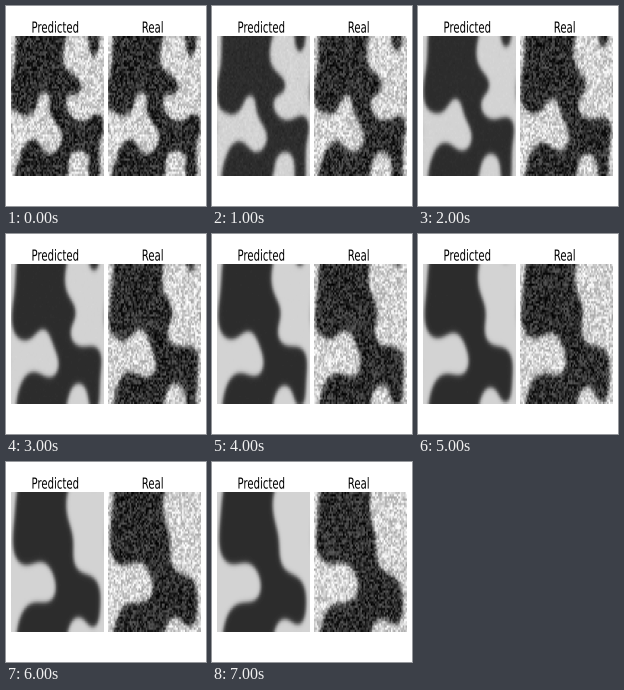
A matplotlib script for the animation above (8000 ms loop, 200 by 200 pixels).

```python
import numpy as np
import matplotlib.pyplot as plt
from matplotlib.animation import FuncAnimation
from matplotlib.patches import PathPatch
from matplotlib.path import Path
from matplotlib.textpath import TextPath
from matplotlib.transforms import Affine2D

SIZE = 200
CELLS, FINE = 64, 128    # shown grid, simulated grid
SQUEEZE = 2 / 3          # a 3:2 layout shown on a square stage
LEFT, TOP, WIDTH, HEIGHT = 5, 30, 92.5, 140
SHIFT = 97.3             # distance between the two panels
DARK, LIGHT = 45, 211
FRAMES, INTERVAL = 8, 1000
STEPS = 100              # simulation steps per frame
EPS = 1.7                # interface width in fine cells

# Key points of the dark domain at the start, clockwise, in stage pixels.
OUTLINE = [
    (57, 20), (57, 46), (59, 61), (70, 71), (76, 81), (70, 88), (60, 91),
    (62, 106), (70, 114), (80, 114), (89, 108), (96, 112), (97, 124),
    (93, 142), (93, 180), (83, 180), (82, 152), (74, 145), (63, 152),
    (57, 180), (11, 180), (14, 150), (21, 137), (30, 134), (38, 144),
    (45, 148), (53, 141), (56, 129), (48, 115), (43, 103), (44, 92),
    (38, 86), (33, 92), (29, 104), (21, 110), (12, 106), (5, 101),
    (4, 80), (9, 60), (15, 20),
]


def smooth(points, n=10):
    """Closed Catmull-Rom curve through the points."""
    p = np.asarray(points, float)
    p0, p2, p3 = np.roll(p, 1, 0), np.roll(p, -1, 0), np.roll(p, -2, 0)
    u = np.linspace(0, 1, n, endpoint=False)[:, None, None]
    curve = 0.5 * (2 * p + (p2 - p0) * u
                   + (2 * p0 - 5 * p + 4 * p2 - p3) * u**2
                   + (3 * p - p0 - 3 * p2 + p3) * u**3)
    return curve.transpose(1, 0, 2).reshape(-1, 2)


def start_field():
    """+1 in the light phase, -1 in the dark one."""
    s = (np.arange(FINE) + 0.5) / FINE
    x, y = np.meshgrid(LEFT + WIDTH * s, TOP + HEIGHT * s)
    cells = np.column_stack([x.ravel(), y.ravel()])
    dark = Path(smooth(OUTLINE)).contains_points(cells).reshape(x.shape)
    finger = ((x - 87.5) / 6) ** 2 + ((y - 24) / 27) ** 2 < 1
    return np.where(dark | finger, -1.0, 1.0)


def flow(u, steps):
    """Allen-Cahn phase separation on a periodic square."""
    for _ in range(steps):
        lap = sum(np.roll(u, d, axis) for d in (1, -1) for axis in (0, 1))
        u = u + 0.2 * (lap - 4 * u + (u - u**3) / EPS**2)
    return u


def simulate():
    u = flow(start_field(), 12)
    states = []
    for _ in range(FRAMES):
        coarse = u.reshape(CELLS, 2, CELLS, 2).mean((1, 3))
        states.append((DARK + LIGHT) / 2 + (LIGHT - DARK) / 2 * coarse)
        u = flow(u, STEPS)
    return states


def fields(t):
    rng = np.random.default_rng(40 + t)
    clean = states[t]
    real = clean + rng.uniform(-47, 47, clean.shape)
    if t == 0:
        return real, real
    return clean + rng.normal(0, 4 / t**1.5, clean.shape), real


def panel(x):
    ax = fig.add_axes([x / SIZE, 1 - (TOP + HEIGHT) / SIZE,
                       WIDTH / SIZE, HEIGHT / SIZE])
    ax.axis("off")
    return ax.imshow(np.zeros((CELLS, CELLS)), cmap="gray", vmin=0, vmax=255,
                     aspect="auto")


def title(text, x):
    path = TextPath((0, 0), text, size=15.2, prop={"family": "DejaVu Sans"})
    box = path.get_extents()
    place = (Affine2D().translate(-(box.x0 + box.x1) / 2, 0)
             .scale(SQUEEZE, -1).translate(x, 26.6))
    stage.add_patch(PathPatch(place.transform_path(path), fc="black", lw=0))


fig = plt.figure(figsize=(2, 2), dpi=100, facecolor="white")
stage = fig.add_axes([0, 0, 1, 1])
stage.set_xlim(0, SIZE)
stage.set_ylim(SIZE, 0)
stage.axis("off")

title("Predicted", 49.3)
title("Real", 146.7)
images = [panel(LEFT), panel(LEFT + SHIFT)]
states = simulate()


def draw(t):
    for image, data in zip(images, fields(t)):
        image.set_data(np.clip(data, 0, 255))
    return images


anim = FuncAnimation(fig, draw, frames=FRAMES, interval=INTERVAL, repeat=True,
                     repeat_delay=0, blit=False)
plt.show()
```
